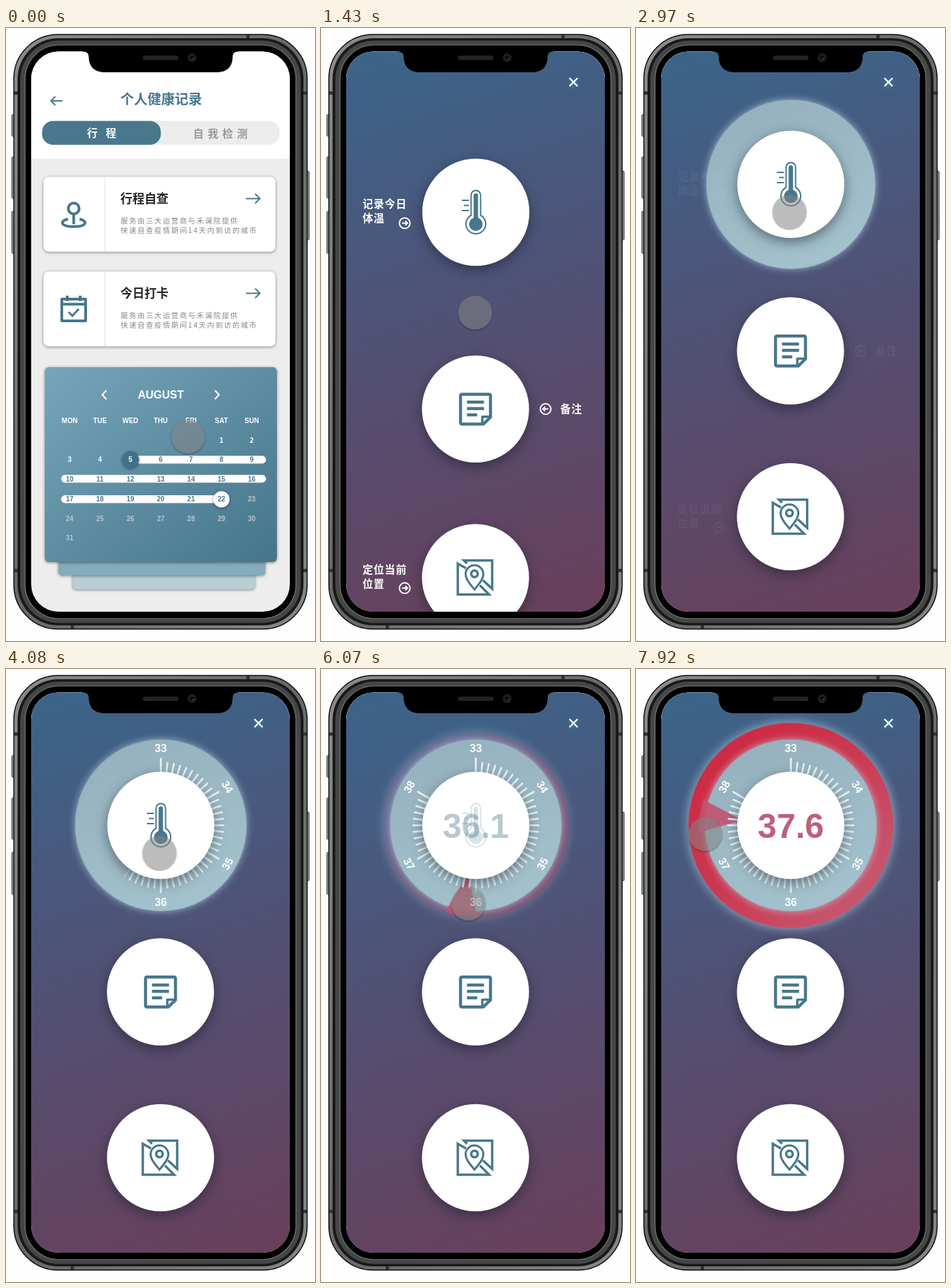
These frames come from a looping animation (454 px wide and 900 px high, 8000 ms). An HTML page:

```html
<!DOCTYPE html>
<html lang="zh-CN">
<head>
<meta charset="utf-8">
<title>Health log</title>
<style>
html, body { margin: 0; width: 100%; height: 100%; overflow: hidden; background: #fefefe; }
svg { display: block; width: 454px; height: 900px; }
text { font-family: "Noto Sans CJK SC", "Noto Sans CJK", sans-serif; font-weight: 700; }
.latin, .latin text { font-family: "Liberation Sans", Arial, sans-serif; text-anchor: middle; }
.small { font-size: 10.4px; font-weight: 300; letter-spacing: 2px; fill: #858585; }
.head { font-size: 17.7px; fill: #262626; }
.ink { fill: none; stroke: #47778c; }
.lift { filter: drop-shadow(0 1px 2px rgba(0,0,0,.45)); }
.disc { fill: #fff; filter: drop-shadow(0 6px 9px rgba(20,25,40,.5)); }
.label { font-size: 15.5px; letter-spacing: .8px; fill: #fff; }
.badge { fill: none; stroke: #fff; stroke-width: 2; }

.label, .menu, .item, .dial, .sweep, .wedge, .spin, .halo, .hot, .thermo, .value, .cursor, .press {
  animation: 8s linear infinite;
}
.menu { animation-name: menu; animation-timing-function: step-end; }
@keyframes menu { 0% { visibility: hidden } 13.56%, 100% { visibility: visible } }

.item { animation-timing-function: cubic-bezier(.3,.3,.3,1); }
.i1 { animation-name: rise1; } .i2 { animation-name: rise2; } .i3 { animation-name: rise3; }
@keyframes rise1 { 0%, 13.6% { translate: 0 336px } 21%, 100% { translate: 0 0 } }
@keyframes rise2 { 0%, 14% { translate: 0 480px } 21.6%, 100% { translate: 0 0 } }
@keyframes rise3 { 0%, 15.4% { translate: 0 260px } 22%, 100% { translate: 0 0 } }

.label { animation-name: unlabel; }
@keyframes unlabel { 0%, 33.5% { opacity: 1 } 37.1% { opacity: .06 } 40%, 100% { opacity: 0 } }

.dial { animation-name: dial; }
@keyframes dial {
  0%, 33% { scale: .6; opacity: 0 }
  34.4% { scale: .76; opacity: .8 }
  37.1% { scale: .985; opacity: 1 }
  44%, 100% { scale: 1; opacity: 1 }
}
.sweep { stroke-dasharray: 1 1; animation-name: sweep; }
@keyframes sweep { 0%, 44.4% { stroke-dashoffset: 1 } 55%, 100% { stroke-dashoffset: 0 } }

.wedge { animation-name: grow; }
@keyframes grow { 0%, 55.75% { scale: .55; opacity: 0 } 62%, 100% { scale: 1; opacity: 1 } }
.spin { animation-name: spin; }
@keyframes spin {
  0%, 73.5% { rotate: 180deg } 81.25%, 88.6% { rotate: 210deg }
  91.8% { rotate: 226deg } 93.8% { rotate: 243deg } 95.9% { rotate: 260deg } 99%, 100% { rotate: 276deg }
}
.halo { animation-name: halo; }
@keyframes halo { 0%, 73.5% { scale: .84; opacity: 0 } 79%, 100% { scale: 1; opacity: 1 } }
.hot { animation-name: hot; }
@keyframes hot { 0%, 88.6% { opacity: 0 } 98.5%, 100% { opacity: 1 } }
.thermo { animation-name: thermo; }
@keyframes thermo { 0%, 73.5% { opacity: 1 } 76.5%, 100% { opacity: 0 } }
.value { font-size: 50px; animation-name: value; }
@keyframes value {
  0%, 74.5% { opacity: 0; fill: #47778c } 78%, 88.6% { opacity: 1; fill: #47778c }
  98.5%, 100% { opacity: 1; fill: #bf5f7b }
}
.cursor { animation-name: move; }
@keyframes move {
  0%, 1% { translate: 267.5px 600px }
  2.75%, 26.6% { translate: 226.5px 418px }
  29% { translate: 215px 346px }
  31.6%, 55.75% { translate: 225.5px 270px }
  62%, 63.6% { translate: 236px 288px }
  64.75% { translate: 260px 321px }
  67.8% { translate: 264px 340px }
  71.6%, 73.5% { translate: 233px 346px }
  81.25%, 88.6% { translate: 180px 341px }
  91.8% { translate: 152px 326px }
  93.8% { translate: 128px 302px }
  95.9% { translate: 111px 274px }
  99%, 100% { translate: 101.5px 242.5px }
}
.press { animation-name: press; }
@keyframes press {
  0%, 5.2%, 7%, 85%, 86.7%, 100% { scale: 1 }
  6%, 85.8% { scale: .9 }
}
</style>
</head>
<body>
<svg viewBox="0 0 454 900" xmlns="http://www.w3.org/2000/svg">
<defs>
  <clipPath id="screen"><rect x="37" y="34.5" width="380" height="822.5" rx="40"/></clipPath>
  <linearGradient id="panel" x1="0" y1="0" x2="1" y2="1"><stop stop-color="#77a5bb"/><stop offset="1" stop-color="#45758a"/></linearGradient>
  <linearGradient id="dusk" gradientUnits="userSpaceOnUse" x1="95" y1="40" x2="360" y2="850">
    <stop stop-color="#3c6489"/><stop offset=".5" stop-color="#525073"/><stop offset="1" stop-color="#68405c"/>
  </linearGradient>
  <linearGradient id="mist" x1="0" y1="0" x2=".4" y2="1"><stop stop-color="#95afbd"/><stop offset="1" stop-color="#a2c1cc"/></linearGradient>
  <linearGradient id="warm" x1="0" y1=".2" x2="1" y2=".8"><stop stop-color="#8e7fac"/><stop offset=".45" stop-color="#a66e92"/><stop offset="1" stop-color="#c05473"/></linearGradient>
  <linearGradient id="fever" x1="0" y1="0" x2="1" y2="1"><stop stop-color="#d0253e"/><stop offset=".5" stop-color="#cc3952"/><stop offset="1" stop-color="#c65f78"/></linearGradient>
  <linearGradient id="steel" x1="0" y1="0" x2="1" y2="1"><stop stop-color="#8b8d8d"/><stop offset=".5" stop-color="#666868"/><stop offset="1" stop-color="#858787"/></linearGradient>
  <mask id="reveal" maskUnits="userSpaceOnUse" x="-130" y="-130" width="260" height="260">
    <circle class="sweep" r="98" pathLength="1" fill="none" stroke="#fff" stroke-width="60" transform="rotate(-99)"/>
  </mask>
  <g id="go" class="badge"><circle r="7.8"/><path d="M-4 0H4M.8-3.2L4 0L.8 3.2"/></g>
  <path id="arrow" class="ink" stroke-width="2" d="M-10.500 0H10M3-7L10 0L3 7"/>
</defs>

<!-- phone body -->
<g fill="#8e9090" stroke="#333" stroke-width=".8">
  <rect x="8.500" y="127" width="5" height="32" rx="1.500"/><rect x="8.500" y="189" width="5" height="61" rx="1.500"/>
  <rect x="8.500" y="269" width="5" height="62" rx="1.500"/><rect x="440.500" y="210" width="5" height="101" rx="1.500"/>
</g>
<rect x="11.500" y="9.500" width="431" height="873" rx="65" fill="url(#steel)" stroke="#0c0c0c" stroke-width="1.500"/>
<path stroke="#333" stroke-width="5" d="M12 95.500h8M434 95.500h8M12 796.500h8M434 796.500h8M355.500 10v7M97.500 875v7"/>
<rect x="17" y="15" width="420" height="862" rx="60" fill="#181919"/>
<rect x="21" y="18.500" width="412" height="855" rx="57" fill="#454747"/>
<rect x="28" y="25" width="398" height="842" rx="50" fill="#000" stroke="#777979" stroke-width="1.200"/>

<g clip-path="url(#screen)">
  <rect x="37" y="34" width="380" height="824" fill="#ededed"/>
  <path fill="#fff" d="M37 34h380v157.500H37z"/>
  <path class="ink" stroke-width="2" d="M83 107H66M72.500 100.500L66 107l6.500 6.500"/>
  <text x="168" y="112.300" font-size="20" fill="#47778f">个人健康记录</text>
  <rect x="53" y="136.500" width="349" height="35" rx="16" fill="#ececec"/>
  <rect x="53" y="136.500" width="174.500" height="35" rx="16" fill="#49788d"/>
  <text x="119 146.500" y="159.500" font-size="15.500" fill="#fff">行程</text>
  <text x="275 296.500 318 339.500" y="160.500" font-size="15.500" fill="#999">自我检测</text>

  <g id="cards"></g>
  <g class="ink" stroke-width="4">
    <circle cx="99.500" cy="265" r="8"/>
    <path d="M99.500 273V288M91 280.500C79 283 79 291.500 99.500 291.500S120 283 108 280.500"/>
    <path d="M82 398h35v32H82z" stroke-linejoin="round"/>
    <path d="M82 405.500h35M90 393v8M109 393v8"/><path stroke-width="3" d="M92 417l5.500 5.500 9.500-10"/>
  </g>

  <rect x="98" y="770" width="267.500" height="54" rx="5" fill="#b9cdd5" class="lift"/>
  <rect x="77" y="770" width="304" height="33.500" rx="5" fill="#86abbc" class="lift"/>
  <rect x="57" y="498" width="341" height="286" rx="6" fill="url(#panel)" class="lift"/>
  <path fill="none" stroke="#fff" stroke-width="2.200" d="M147.500 532l-6 6.500 6 6.500M307 532l6 6.500-6 6.500"/>
  <g fill="#fff">
    <rect x="178" y="628" width="204" height="11.500" rx="5.700"/><rect x="81" y="656" width="301" height="11.500" rx="5.700"/>
    <rect x="81" y="686" width="240" height="11.500" rx="5.700"/>
    <circle class="lift" cx="183" cy="634" r="12.500" fill="#42728a"/><circle class="lift" cx="316.500" cy="692" r="12"/>
  </g>
  <g id="days" class="latin" font-size="10" fill="#fff"><text x="227.500" y="544" font-size="16">AUGUST</text></g>

  <g class="menu">
    <rect x="37" y="34" width="380" height="824" fill="url(#dusk)"/>
    <path d="M365 73.500l12 12m0-12l-12 12" stroke="#fff" stroke-width="2.200" style="filter:drop-shadow(0 2px 3px #3c8ba0)"/>

    <g class="item i3">
      <circle class="disc" cx="227" cy="717.500" r="78.700"/>
      <g class="ink" stroke-width="3.500">
        <path d="M213 704L201 697V742.500H247L233.500 729M214.500 697L210 692.500H251.500V734L238 721.500"/>
        <path stroke-width="3" d="M225.500 735C219 727 212.500 720 212.500 712.500a13 13 0 0 1 26 0C238.500 720 232 727 225.500 735z"/>
        <circle cx="225.500" cy="712" r="4.800"/>
      </g>
      <g class="label"><text x="61" y="712">定位当前</text><text x="61" y="732.500">位置</text><use href="#go" x="123" y="733"/></g>
    </g>

    <g class="item i2">
      <circle class="disc" cx="227" cy="474" r="78.700"/>
      <g class="ink" stroke-width="4.500" stroke-linejoin="round">
        <path d="M207 452.300h40a2 2 0 0 1 2 2V486L238.500 496.200H207a2 2 0 0 1-2-2V454.300a2 2 0 0 1 2-2z"/>
        <path stroke-width="3.500" d="M237 495V485.500h11"/>
        <path d="M214.500 464h25M214.500 473.300h25M214.500 482.700h15"/>
      </g>
      <g class="label"><text x="351.500" y="480">备注</text><use href="#go" transform="translate(330 474) scale(-1 1)"/></g>
    </g>

    <g class="item i1">
      <g transform="translate(227.500 229.500)">
        <g class="halo">
          <g fill="none" stroke-width="25" style="filter:drop-shadow(0 0 8px rgba(185,215,230,.75))">
            <circle r="138" stroke="url(#warm)"/><circle class="hot" r="138" stroke="url(#fever)"/>
          </g>
        </g>
        <g class="dial"><circle r="126" fill="url(#mist)" style="filter:drop-shadow(0 0 6px rgba(190,220,232,.7))"/></g>
        <g class="spin" id="spin"><path class="wedge" fill="#c2506f" fill-opacity=".88" d="M0-72L-24-132A136 136 0 0 1 24-132z"/></g>
        <g mask="url(#reveal)"><g id="ticks" class="latin" font-size="16" fill="#fff" stroke-linecap="round"></g></g>
        <circle class="disc" r="78.700"/>
        <text class="latin value" id="value" y="18.500">36.0</text>
      </g>
      <g class="thermo ink" stroke-width="2">
        <path d="M220.500 234V204.500a7 7 0 0 1 14 0V234A14.500 14.500 0 1 1 220.500 234zM207 212h10.500M210 219.500h7.500M207 227h10.500"/>
        <path stroke-width="6.500" stroke-linecap="round" d="M227.500 205v36"/>
        <circle cx="227.500" cy="247" r="10" fill="#47778c" stroke="none"/>
      </g>
      <g class="label"><text x="61" y="223.500">记录今日</text><text x="61" y="244">体温</text><use href="#go" x="123" y="245.500"/></g>
    </g>
  </g>

  <foreignObject width="454" height="900">
    <div xmlns="http://www.w3.org/1999/xhtml" class="cursor" style="width:0;height:0">
      <div class="press" style="position:relative;left:-25px;top:-25px;width:50px;height:50px;border-radius:50%;background:rgba(131,131,131,.54);box-shadow:0 1px 2px rgba(0,0,0,.45)"></div>
    </div>
  </foreignObject>
</g>

<!-- notch -->
<path d="M112 32v2.500c6 0 9 2 9.500 7c0 15 8 23.500 24 23.500h164c16 0 23.500-8.500 23.500-23.500c.5-5 3.500-7 9-7V32z"/>
<rect x="201" y="40.500" width="52.500" height="6.500" rx="3.200" fill="#232323"/>
<circle cx="273.500" cy="43.500" r="6.500" fill="#1f1f20"/><circle cx="273.500" cy="43.500" r="3" fill="#0b0b0e"/>
<circle cx="275" cy="45" r="1" fill="#55555c"/>
</svg>
<script>
const $ = id => document.getElementById(id);
const add = (id, markup) => $(id).insertAdjacentHTML('beforeend', markup);

['行程自查', '今日打卡'].forEach((title, i) => add('cards', `<g transform="translate(0 ${i * 139})">
  <rect class="lift" x="55" y="218.5" width="341" height="110" rx="8" fill="#fff"/>
  <path d="M145 219v109" stroke="#ebebeb" stroke-width="1.5"/>
  <text class="head" x="168" y="256.5">${title}</text>
  <use href="#arrow" x="363" y="250.5"/>
  <text class="small" x="168.5" y="286.5">服务由三大运营商与禾澜院提供</text>
  <text class="small" x="168.5" y="300.7">快速自查疫情期间14天内到访的城市</text></g>`));

const colX = c => 93.5 + c * 44.6;
const rowY = [608.6, 637.2, 665.6, 695.2, 723.6, 752];
'MON TUE WED THU FRI SAT SUN'.split(' ').forEach((d, c) => add('days', `<text x="${colX(c)}" y="580">${d}</text>`));
for (let d = 1; d <= 31; d++) {
  const cell = d + 4;
  const fill = d > 22 ? '#b4c6ce' : d > 5 ? '#47778f' : '#fff';
  add('days', `<text x="${colX(cell % 7)}" y="${rowY[Math.floor(cell / 7)]}" fill="${fill}">${d}</text>`);
}

for (let a = 0; a <= 300; a += 6) {
  const major = a % 60 === 0;
  add('ticks', `<path d="M0-76V${major ? -98 : -92}" stroke="#e6eff2" stroke-width="2.8" transform="rotate(${a})"/>`);
  if (!major) continue;
  const flip = a > 90 && a < 270 ? 180 : 0;
  add('ticks', `<text y="5.7" transform="rotate(${a}) translate(0 -113) rotate(${flip})">${33 + a / 60}</text>`);
}

// The reading follows the pointer: 60 degrees of turn per degree of heat.
const pointer = getComputedStyle($('spin'));
function tick() {
  $('value').textContent = (33 + parseFloat(pointer.rotate) / 60).toFixed(1);
  requestAnimationFrame(tick);
}
requestAnimationFrame(tick);
</script>
</body>
</html>
```
